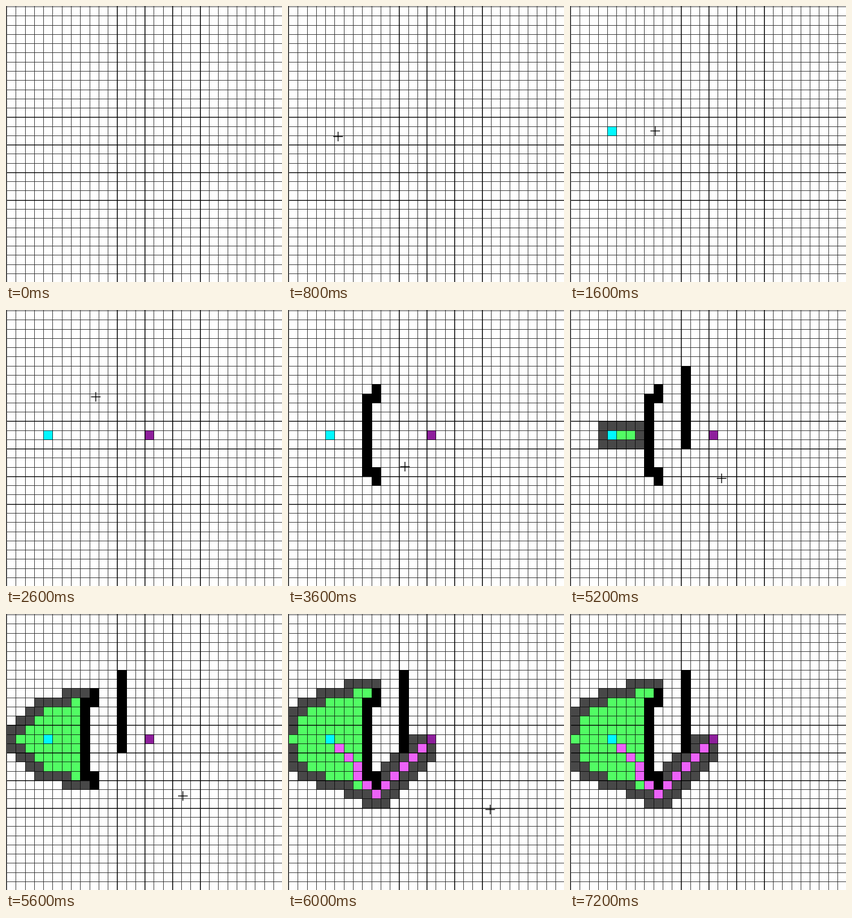
These frames come from a looping animation (518x518 px, 7300 ms). An HTML page:

```html
<!DOCTYPE html>
<html lang="en">
<head>
<meta charset="utf-8">
<title>Grid path search</title>
<style>
html, body { margin: 0; width: 100%; height: 100%; overflow: hidden; background: #fff; }
svg { display: block; width: 518px; height: 518px; }
</style>
</head>
<body>
<svg viewBox="0 0 518 518" shape-rendering="crispEdges">
  <rect width="518" height="518" fill="#fefefe"/>
  <path id="open" fill="#484848"/>
  <path id="closed" fill="#52fc64"/>
  <path id="route" fill="#ec62f8"/>
  <path id="start" fill="#00f8ff"/>
  <path id="goal" fill="#8e1f9c"/>
  <path id="thin" fill="#000" fill-opacity=".82"/>
  <path id="bold" fill="#000"/>
  <path id="wall" fill="#000"/>
  <rect width="2" height="518" fill="#484848"/>
  <path id="cursor" d="M-9 0H9M0 -9V9" stroke="#000" stroke-width="1.5" shape-rendering="auto"/>
</svg>
<script>
const LOOP = 7300, TICK = 100;
const el = id => document.getElementById(id);
const line = i => Math.round(1.15 + i * 518 / 30);
const mid = i => (line(i) + line(i + 1)) / 2;
const key = ([c, r]) => c + ',' + r;
const box = (x, y, w, h) => `M${x} ${y}h${w}v${h}h${-w}z`;
const paint = (id, cells) => el(id).setAttribute('d', cells.map(([c, r]) =>
  box(line(c), line(r), line(c + 1) - line(c) + 1, line(r + 1) - line(r) + 1)).join(''));
const span = (a, b, f) => Array.from({ length: b - a + 1 }, (_, i) => f(a + i));

// grid
let thin = '', bold = '';
for (let i = 0; i < 30; i++) {
  const p = line(i);
  if (i >= 12 && i <= 21 && i % 3 === 0) bold += box(p, 0, 1.6, 518) + box(0, p, 518, 1.6);
  else thin += box(p, 0, 1, 518) + box(0, p, 518, 1);
}
el('thin').setAttribute('d', thin);
el('bold').setAttribute('d', bold);
el('bold').setAttribute('shape-rendering', 'auto');

// board
const start = [4, 13], goal = [15, 13];
const wallA = [[9, 8], [9, 9], ...span(9, 17, r => [8, r]), [9, 17], [9, 18]];
const wallB = span(6, 14, r => [12, r]);
const solid = new Set([...wallA, ...wallB].map(key));
const route = [[5, 14], [6, 15], [7, 16], [7, 17], [8, 18], [9, 19], ...span(10, 14, c => [c, 28 - c])];

// expanded cells: first and last column for rows 8 to 18
const rows = [[7, 8], [4, 7], [2, 7], [1, 7], [1, 7], [0, 7], [1, 7], [1, 7], [2, 7], [4, 7], [7, 8]];
const area = rows.flatMap(([a, b], i) => span(a, b, c => [c, 8 + i]));
area.push(...route.slice(5));

const dist = ([c, r]) => Math.abs(goal[0] - c) + Math.abs(goal[1] - r);
function rank(cell) {
  if (cell[0] > 8) return 100 + cell[0];
  const dx = Math.abs(cell[0] - start[0]), dy = Math.abs(cell[1] - start[1]);
  return Math.max(dx, dy) + 0.414 * Math.min(dx, dy) + dist(cell);
}
// equal ranks: nearest to the start first
area.sort((a, b) => rank(a) - rank(b) || dist(b) - dist(a));

function fringe(done) {
  const seen = new Set(done.map(key)), out = [];
  for (const [c, r] of done)
    for (let k = 0; k < 9; k++) {
      const n = [c + k % 3 - 1, r + Math.floor(k / 3) - 1], id = key(n);
      if (n[0] < 0 || seen.has(id) || solid.has(id)) continue;
      seen.add(id);
      out.push(n);
    }
  return out;
}

// pointer: time, x, y
const stops = [
  [400, 20, 420], [600, 70, 300], [800, 94, 245], [1000, mid(4), mid(13)], [1300, mid(4), mid(13)],
  [2000, mid(15), mid(13)], [2200, mid(15), mid(13)], [2600, 168.5, 163],
  [2700, mid(9), mid(8)], [2800, mid(8), mid(9)], [3200, mid(8), mid(17)], [3400, mid(9), mid(18)],
  [3600, 219.5, 294], [4000, mid(12), mid(6)], [4600, mid(12), mid(14)],
  [5200, 284.5, 316], [6000, 379.5, 367], [6300, 505, 478]
];
function pointer(t) {
  const i = stops.findIndex(s => s[0] >= t);
  if (i < 0 || t < stops[0][0]) return null;
  const b = stops[i], a = stops[i - 1] || b;
  const u = a === b ? 0 : (t - a[0]) / (b[0] - a[0]);
  return [1, 2].map(k => a[k] + (b[k] - a[k]) * u);
}

const drawn = (cells, t, from, to) =>
  t < from ? [] : cells.slice(0, 1 + Math.floor((cells.length - 1) * Math.min(1, (t - from) / (to - from))));

function render(t) {
  const n = t < 5200 ? 0 : Math.min(area.length, 3 + Math.floor((t - 5200) / TICK) * 9);
  const done = area.slice(0, n);
  paint('closed', done);
  paint('open', fringe(done));
  paint('route', t >= 5900 ? route : []);
  paint('start', t >= 1000 ? [start] : []);
  paint('goal', t >= 2000 ? [goal] : []);
  paint('wall', [...drawn(wallA, t, 2700, 3400), ...drawn(wallB, t, 4000, 4600)]);
  const p = pointer(t);
  el('cursor').setAttribute('visibility', p ? 'visible' : 'hidden');
  if (p) el('cursor').setAttribute('transform', `translate(${p})`);
}

let last = -1;
const origin = performance.now();
function loop() {
  const t = Math.floor((performance.now() - origin) % LOOP / TICK) * TICK;
  if (t !== last) render(last = t);
  requestAnimationFrame(loop);
}
loop();
</script>
</body>
</html>
```
